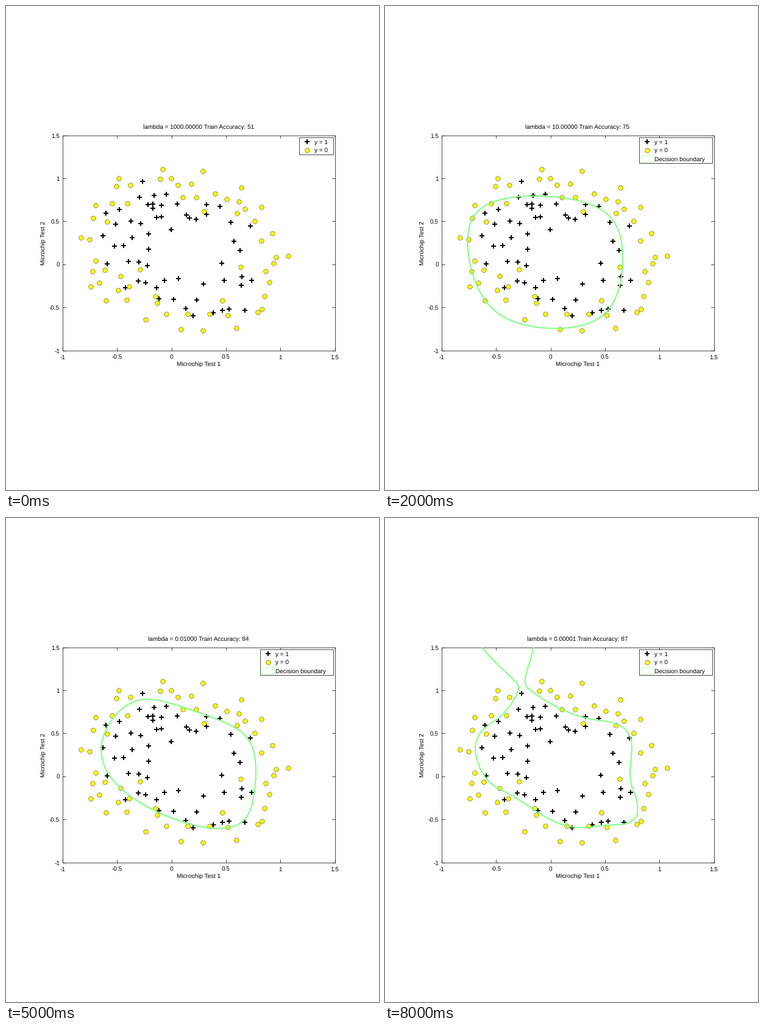
These frames come from a looping animation (612x792 px, 8.5 s). A matplotlib script:

```python
import numpy as np
import matplotlib.pyplot as plt
from matplotlib.animation import FuncAnimation
from matplotlib.patches import Rectangle

plt.rcParams["font.family"] = "Liberation Sans"
plt.rcParams["font.size"] = 10
plt.rcParams["text.hinting"] = "none"

W, H = 612, 792
LEFT, RIGHT, TOP, BOTTOM = 93.0, 539.5, 211.5, 563.5
LO, HI = -1.0, 1.5
GREEN = (0.5, 1.0, 0.5)
THIN = 0.7
STEPS = 17

PASSED = np.array([
    (.051, .700), (-.093, .685), (-.214, .692), (-.375, .502), (-.513, .466),
    (-.525, .210), (-.398, .034), (-.306, -.192), (.017, -.404), (.132, -.514),
    (.385, -.565), (.529, -.521), (.639, -.243), (.737, -.185), (.547, .488),
    (.322, .583), (.166, .539), (-.047, .817), (-.173, .700), (-.479, .634),
    (-.605, .597), (-.628, .334), (-.594, .005), (-.421, -.273), (-.116, -.397),
    (.201, -.602), (.466, -.536), (.673, -.536), (-.139, .546), (-.294, .780),
    (-.266, .963), (-.162, .802), (-.173, .648), (-.283, .473), (-.363, .312),
    (-.300, .027), (-.237, -.214), (-.064, -.185), (.063, -.163), (.230, -.412),
    (.293, -.229), (.483, -.185), (.645, -.141), (.460, .012), (.627, .159),
    (.575, .268), (.725, .444), (.224, .524), (.443, .670), (.322, .692),
    (.138, .575), (-.006, .400), (-.093, .553), (-.208, .356), (-.208, .173),
    (-.438, .217), (-.219, -.017), (-.139, -.273)])

FAILED = np.array([
    (.184, .933), (.224, .780), (.299, .619), (.506, .758), (.616, .729),
    (.604, .597), (.766, .502), (.927, .363), (.823, .276), (.961, .086),
    (.938, .012), (.863, -.083), (.898, -.207), (.852, -.368), (.829, -.521),
    (.794, -.558), (.593, -.741), (.518, -.594), (.466, -.419), (.351, -.580),
    (.287, -.770), (.086, -.755), (.149, -.580), (-.133, -.448), (-.410, -.412),
    (-.392, -.258), (-.744, -.258), (-.698, .042), (-.755, .290), (-.698, .685),
    (-.404, .707), (-.381, .919), (-.507, .904), (-.548, .707), (.103, .780),
    (.057, .919), (-.104, .992), (-.081, 1.109), (.287, 1.087), (.397, .824),
    (.639, .890), (.823, .663), (.673, .641), (1.071, .100), (-.047, -.580),
    (-.237, -.638), (-.150, -.368), (-.490, -.302), (-.467, -.134), (-.289, -.061),
    (-.611, -.068), (-.663, -.214), (-.600, -.419), (-.726, -.083), (-.830, .312),
    (-.721, .539), (-.594, .495), (-.484, .999), (-.006, .999), (.633, -.031)])


def px(x):
    return LEFT + (np.asarray(x) - LO) / (HI - LO) * (RIGHT - LEFT)


def py(y):
    return BOTTOM - (np.asarray(y) - LO) / (HI - LO) * (BOTTOM - TOP)


# --- regularised logistic regression on degree-6 features ---

def features(x, y):
    return np.stack([x ** (i - j) * y ** j
                     for i in range(7) for j in range(i + 1)], axis=-1)


X = features(*np.vstack([PASSED, FAILED]).T)
Y = np.r_[np.ones(len(PASSED)), np.zeros(len(FAILED))]


def cost(theta, lam):
    z = X @ theta
    reg = np.r_[0, theta[1:]] * lam / len(Y)
    value = np.mean(np.logaddexp(0, z) - Y * z) + reg @ theta / 2
    grad = X.T @ (1 / (1 + np.exp(-z)) - Y) / len(Y) + reg
    return value, grad


def dogleg(hess, chol, grad, delta):
    b = np.linalg.solve(chol, grad)
    full = np.linalg.solve(chol.T, b)
    size = np.linalg.norm(full)
    if size <= delta:
        return -full
    gn = np.linalg.norm(grad)
    unit = grad / gn
    reach = gn / (unit @ hess @ unit)
    alpha = 0.0
    if reach < delta:
        d, q = delta / size, reach / delta
        t = (b @ b) / (gn * size) * q
        t -= d * q * q - np.sqrt((t - d) ** 2 + (1 - d * d) * (1 - q * q))
        alpha = d * (1 - q * q) / t
    return -(alpha * full + (1 - alpha) * min(reach, delta) * unit)


def fit(lam, max_iter=400, tol=1e-7):
    """Trust-region BFGS, started from zero."""
    n = X.shape[1]
    theta = np.zeros(n)
    hess = chol = np.eye(n)
    value, grad = cost(theta, lam)
    delta, last, count = 0.1, 0.0, 1
    while count < max_iter and np.linalg.norm(grad) > tol * n * n:
        shrink, moved = 0.5, False
        while not moved and count <= max_iter:
            step = dogleg(hess, chol, grad, delta)
            length = np.linalg.norm(step)
            if count == 1:
                delta = min(delta, length)
            new_value, new_grad = cost(theta + step, lam)
            actual = -1.0
            if new_value < value:
                actual = (value - new_value) / (abs(value) + abs(new_value))
            change = step @ hess @ step / 2 + grad @ step
            ratio = 0.0
            if change < 0:
                ratio = actual * (abs(value) + abs(value + change)) / -change
            if ratio < min(max(0.1, 0.8 * last), 0.9):
                delta *= shrink
                shrink **= 1.4142
                if delta < 1e-14:
                    return theta
            else:
                last, shrink = ratio, 0.5
                if abs(1 - ratio) <= 0.1:
                    delta = 1.4142 * length
                elif ratio >= 0.5:
                    delta = max(delta, 1.4142 * length)
            moved = ratio >= 1e-4
            count += 1
        if not moved:
            break
        theta = theta + step
        if length <= tol * np.linalg.norm(theta) or actual < tol:
            break
        # damped BFGS update
        diff = new_grad - grad
        bs = hess @ step
        sbs = step @ bs
        damp = 0.8 / max(1 - step @ diff / sbs, 0.8)
        r = damp * diff + (1 - damp) * bs
        hess = hess + np.outer(r, r) / (step @ r) - np.outer(bs, bs) / sbs
        try:
            chol = np.linalg.cholesky(hess)
        except np.linalg.LinAlgError:
            hess = chol = np.eye(n)
        value, grad = new_value, new_grad
    return theta


axis = np.linspace(LO, HI, 50)
grid = features(*np.meshgrid(axis, axis))
titles, levels = [], []
for k in range(STEPS):
    lam = 10 ** (3 - k / 2)
    theta = fit(lam)
    accuracy = 100 * np.mean((X @ theta >= 0) == (Y == 1))
    titles.append(f"lambda = {lam:.5f} Train Accuracy: {accuracy:.0f}")
    levels.append(grid @ theta)


# --- drawing, in pixels from the top left ---

fig = plt.figure(figsize=(W / 72, H / 72), dpi=72, facecolor="white")
ax = fig.add_axes([0, 0, 1, 1])
ax.set_xlim(0, W)
ax.set_ylim(H, 0)
ax.axis("off")


def label(x, y, text, ha="center", **kw):
    return ax.text(x, y, text, ha=ha, va="baseline", color="black", **kw)


def box(x0, y0, x1, y1, color="black", width=THIN, z=5):
    return ax.add_patch(Rectangle((x0, y0), x1 - x0, y1 - y0, fc="white", ec=color,
                                  lw=width, zorder=z, snap=True))


def tick(xs, ys):
    ax.plot(xs, ys, color="black", lw=THIN, zorder=1, snap=True)


def pluses(x, y, z=2):
    return ax.plot(x, y, "+", color="black", ms=7.5, mew=2, zorder=z)[0]


def dots(x, y, z=3):
    return ax.plot(x, y, "o", mfc="#ffff00", mec="black", ms=7.5, mew=0.4, zorder=z)[0]


def legend(x0, y1, names):
    items = [box(x0, 214.5, 536.5, y1),
             pluses([x0 + 13], [221.5], 6), dots([x0 + 13], [235.5], 6)]
    if len(names) > 2:
        items.append(box(x0 + 3, 244.5, x0 + 23, 254.5, GREEN, 0.5, 6))
    for i, name in enumerate(names):
        items.append(label(x0 + 26, 226 + 14 * i, name, ha="left", zorder=7))
    return items


box(LEFT, TOP, RIGHT, BOTTOM, z=0)
for v in np.arange(LO, HI + 0.1, 0.5):
    x, y = px(v), py(v)
    tick([x, x], [BOTTOM, BOTTOM - 4.5])
    tick([x, x], [TOP, TOP + 4.5])
    tick([LEFT, LEFT + 4.5], [y, y])
    tick([RIGHT, RIGHT - 4.5], [y, y])
    label(x, 578, f"{v:g}")
    label(88, y + 4.5, f"{v:g}", ha="right")

label(316, 589, "Microchip Test 1")
ax.text(65.5, 387.5, "Microchip Test 2", rotation=90, ha="right", va="center",
        rotation_mode="default")
title = label(316, 201, "")

pluses(px(PASSED[:, 0]), py(PASSED[:, 1]))
dots(px(FAILED[:, 0]), py(FAILED[:, 1]))
short_key = legend(480.5, 242.5, ["y = 1", "y = 0"])
long_key = legend(416.5, 256.5, ["y = 1", "y = 0", "Decision boundary"])
boundary = []


def draw(k):
    has_boundary = k >= 2
    title.set_text(titles[k])
    for item in short_key:
        item.set_visible(not has_boundary)
    for item in long_key:
        item.set_visible(has_boundary)
    while boundary:
        boundary.pop().remove()
    if has_boundary:
        boundary.append(ax.contour(px(axis), py(axis), levels[k], [0],
                                   colors=[GREEN], linewidths=2, zorder=4))
        ax.set_xlim(0, W)
        ax.set_ylim(H, 0)
    return []


anim = FuncAnimation(fig, draw, frames=STEPS, interval=500, repeat=True,
                     repeat_delay=0, blit=False)
plt.show()
```
